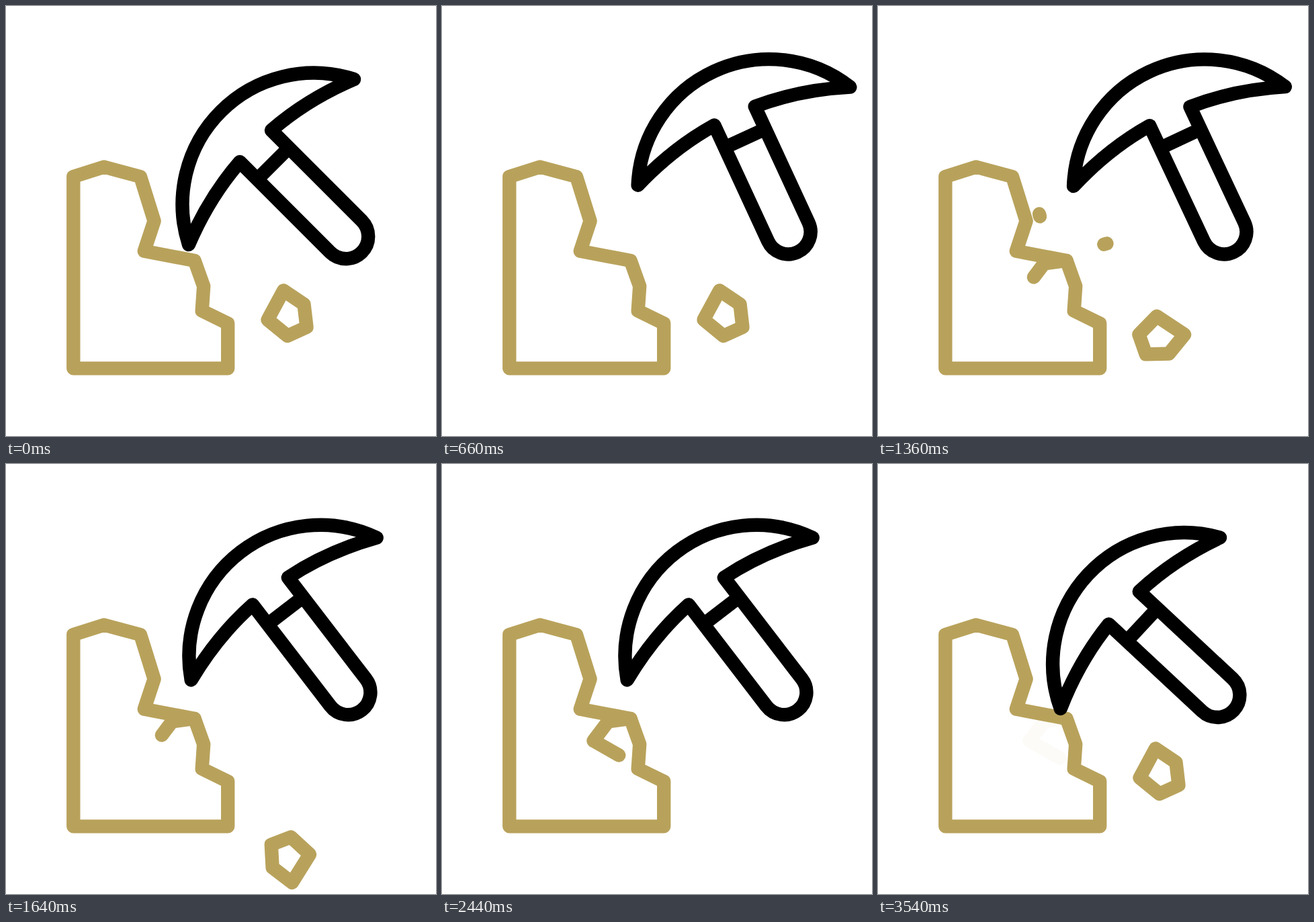
Animation, 640 px wide and 640 px high, one loop 3600 ms. Source, as an HTML page:

```html
<!DOCTYPE html>
<html lang="en">
<head>
<meta charset="utf-8">
<title>Pickaxe</title>
<style>
  html, body { margin: 0; width: 100%; height: 100%; overflow: hidden; background: #fff; }
  svg { display: block; width: 100%; height: 100%; }
  path { fill: none; stroke: #b8a25b; stroke-width: 20.4; stroke-linecap: round; stroke-linejoin: round; }
  #pick { stroke: #000; }
  #chip { fill: #fff; }
</style>
</head>
<body>
<svg viewBox="0 0 640 640">
  <path d="M100.300 254 146 239.500 200 254 220.600 320 205.800 364.800 280.600 379 294.200 417 291.700 453.700 330.200 472.500V539.400H100.300Z"/>
  <path id="crack" d="M280.600 379 247 383.500 225.500 412 280 443"/>
  <path id="chip" d="M413 423.500 443.500 444 447.500 478 419 491 389.500 467Z"/>
  <path class="spark" d="M250 349 240 309.500"/>
  <path class="spark" d="M297 366 340.500 353.500"/>
  <path id="pick" d="M272 355A195.500 195.500 0 0 1 518 109Q448 139 395 185L529.500 319.500A33.200 33.200 0 0 1 482.500 366.500L348 232Q302 285 272 355ZM421 211 374 258"/>
</svg>
<script>
const LOOP = 3600, GROW = 210;
const START = 215, SWING = 400, REST = START + 6 * SWING;
const HITS = [1010, 1810, 2610], LAST = HITS[2];
const UP = 21.3, DOWN = -2;
const CRACK_LENGTHS = [0, 59, 113, 121];

const $ = id => document.getElementById(id);
const sparks = [...document.querySelectorAll('.spark')];
const ramp = (t, from, length) => Math.min(1, Math.max(0, (t - from) / length));
const mix = (a, b, k) => a + (b - a) * k;
const cubicInOut = u => u < 0.5 ? 4 * u ** 3 : 1 - 4 * (1 - u) ** 3;
const softInOut = u => mix(u * u * (3 - 2 * u), u, 0.15);

// Show only the part of a path between two lengths along it.
function trim(path, from, to) {
  path.style.visibility = to > from ? 'visible' : 'hidden';
  path.setAttribute('stroke-dasharray', `${to - from} 999`);
  path.setAttribute('stroke-dashoffset', -from);
}

function pickAngle(t) {
  if (t < START) return 0;
  if (t >= REST) return DOWN;
  const swing = Math.floor((t - START) / SWING);
  const k = softInOut((t - START) / SWING - swing);
  if (swing % 2) return mix(UP, DOWN, k);
  return mix(swing ? DOWN : 0, UP, k);
}

function drawChip(t) {
  let x = 0, y = 0, turn = 0;
  if (t < LAST) {
    const fall = Math.max(0, t - 640) / 720;
    y = 34.5 * fall ** 4;
    turn = 95 * fall ** 2;
  } else {
    const u = ramp(t, LAST, 930), left = 1 - cubicInOut(u);
    x = -156.8 * left;
    y = -45.8 * left - 132 * u * (1 - u);
    turn = -80.3 * left;
  }
  $('chip').style.visibility = t > 1820 && t < LAST ? 'hidden' : 'visible';
  $('chip').setAttribute('transform', `translate(${x} ${y}) rotate(${turn} 420.5 458.6)`);
}

function drawCrack(t) {
  const length = HITS.reduce((sum, hit, i) =>
    sum + (CRACK_LENGTHS[i + 1] - CRACK_LENGTHS[i]) * ramp(t, hit, GROW), 0);
  trim($('crack'), 0, length);
  $('crack').style.opacity = mix(1, 0.04, ramp(t, LAST, 100));
}

function drawSparks(t) {
  const hit = HITS.findLast(h => t >= h) ?? Infinity;
  const head = ramp(t, hit, GROW), tail = ramp(t, hit + 220, 145);
  for (const spark of sparks) {
    const length = spark.getTotalLength();
    trim(spark, tail * length, head * length);
  }
}

function draw(now) {
  const t = now % LOOP;
  $('pick').setAttribute('transform', `rotate(${pickAngle(t)} 530 366)`);
  drawChip(t);
  drawCrack(t);
  drawSparks(t);
  requestAnimationFrame(draw);
}

draw(0);
</script>
</body>
</html>
```
